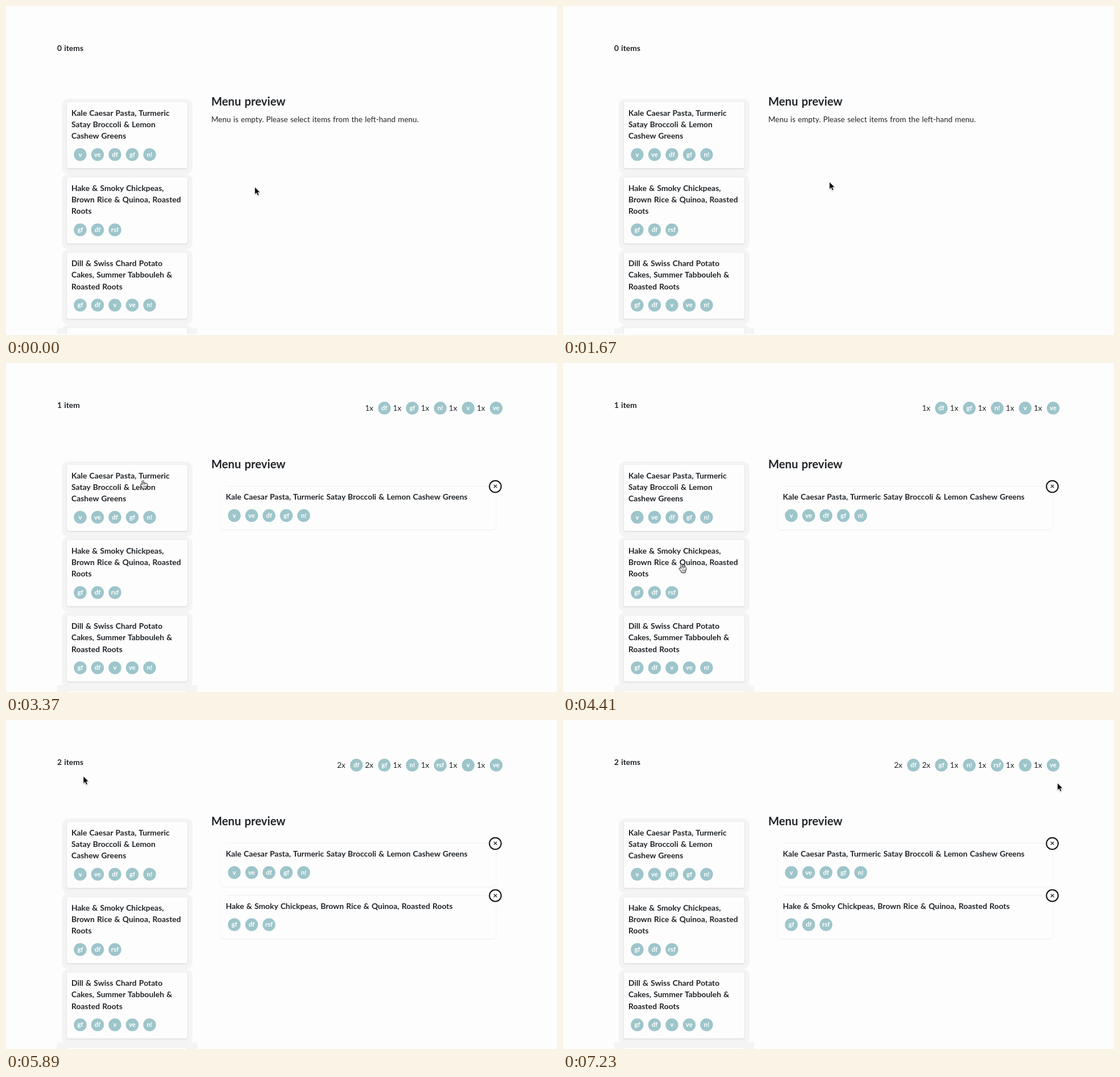
Animation of 969 by 578 pixels, one loop 8000 ms. Source, as an HTML page:

```html
<!DOCTYPE html>
<html lang="en">
<head>
<meta charset="utf-8">
<title>Menu builder</title>
<style>
  html, body { margin: 0; width: 100%; height: 100%; overflow: hidden; background: #fdfdfd; }
  svg { display: block; width: 969px; height: 578px; }
  text { font: 13.5px Lato, "Open Sans", sans-serif; word-spacing: .8px; fill: #212529; }
  .bold { font-size: 13.9px; font-weight: 700; }
  .title { font-size: 20.2px; font-weight: 700; word-spacing: 1.4px; }
  .chip circle { fill: #9dc5ca; }
  .chip text { font-size: 11.5px; font-weight: 700; fill: #fff; text-anchor: middle; }
  .frame { fill: #f4f4f4; }
  .card { fill: #fdfdfd; filter: drop-shadow(0 1px 1.5px rgba(0, 0, 0, .13)); }
  .wide { fill: #fdfdfd; filter: drop-shadow(0 1.5px 1px rgba(0, 0, 0, .07)); }
  .close circle { fill: #fdfdfd; stroke: #111; stroke-width: 2; }
  .close text { font-size: 14px; font-weight: 700; text-anchor: middle; }
  .bg { fill: #fdfdfd; }
  #cursor { filter: drop-shadow(0 1px 1px rgba(0, 0, 0, .25)); }
</style>
</head>
<body>
<svg viewBox="0 0 969 578">
  <text id="count" class="bold" x="90" y="79"></text>
  <g id="summary"></g>
  <g id="list"></g>
  <text id="title" class="title" x="361" y="175">Menu preview</text>
  <text id="empty" x="361" y="204">Menu is empty. Please select items from the left-hand menu.</text>
  <g id="preview"></g>
  <g id="cursor">
    <path id="arrow" d="M0 0V13L3 10.2L5 15L7.4 14L5.4 9.4H9.4Z" stroke="#fff" stroke-width=".8"/>
    <g id="hand" fill="#fff" stroke="#111" stroke-linejoin="round" stroke-linecap="round">
      <path d="M-1.6 7.5V1.5Q-.3 -1 1 1.5V5Q2.5 4 3.3 5.3Q7.4 4 7.4 7.5V10L6 13.2V15H-.8V13.5L-4.6 8.6Q-4.8 6.4 -2.8 7.1Z"/>
      <path stroke-width=".7" d="M1 5v3m2.3-2.5v2.5M1 10v2.5m2-2.5v2.5m2-2.5v2.5"/>
    </g>
  </g>
</svg>
<script>
const $ = id => document.getElementById(id);
const LOOP = 8000, STEP = 89;
const ADD_TIMES = [3370, 4610];

const dishes = [
  { lines: ['Kale Caesar Pasta, Turmeric', 'Satay Broccoli &amp; Lemon', 'Cashew Greens'], tags: ['v', 've', 'df', 'gf', 'n!'] },
  { lines: ['Hake &amp; Smoky Chickpeas,', 'Brown Rice &amp; Quinoa, Roasted', 'Roots'], tags: ['gf', 'df', 'rsf'] },
  { lines: ['Dill &amp; Swiss Chard Potato', 'Cakes, Summer Tabbouleh &amp;', 'Roasted Roots'], tags: ['gf', 'df', 'v', 've', 'n!'] }
];

const at = (x, y, content) => `<g transform="translate(${x} ${y})">${content}</g>`;
const rect = (cls, x, y, w, h, r = 0) =>
  `<rect class="${cls}" x="${x}" y="${y}" width="${w}" height="${h}" rx="${r}"/>`;
const label = (x, y, s, cls = '') => `<text class="${cls}" x="${x}" y="${y}">${s}</text>`;
const chip = (x, y, s) =>
  at(x, y, `<g class="chip"><circle r="11.2"/>${label(0, 3.8, s)}</g>`);
const chips = (x, y, tags) => tags.map((s, i) => chip(x + i * 30.5, y, s)).join('');
const emptyCard = rect('frame', 0, 0, 230, 132.25, 12) + rect('card', 9, 6, 212, 116, 4);

function listCard(dish, i) {
  const lines = dish.lines.map((s, k) => label(17, 29.5 + k * 20.3, s, 'bold')).join('');
  return at(98, 163 + i * 132.25, emptyCard + lines + chips(32.5, 98, dish.tags));
}

function previewCard(dish, i) {
  return at(377.5, 217 + i * 91.5, rect('wide', 0, 0, 484, 75.5, 6) +
    '<path d="M10 -.3H473" stroke="#f0f0f0"/>' +
    label(9, 23, dish.lines.join(' '), 'bold') + chips(24, 51, dish.tags) +
    at(483, 0, `<g class="close"><circle r="10.3"/>${label(0, 4.4, '×')}</g>`));
}

function summary(chosen) {
  const tags = chosen.flatMap(d => d.tags);
  const names = [...new Set(tags)].sort();
  return names.map((name, i) => {
    const x = 862 - 49.15 * (names.length - 1 - i);
    return label(x - 34, 83.5, tags.filter(s => s === name).length + 'x') + chip(x, 79.3, name);
  }).join('');
}

function showItems(n) {
  const chosen = dishes.slice(0, n), shift = n ? 10 : 0;
  $('count').textContent = n + (n === 1 ? ' item' : ' items');
  $('summary').innerHTML = summary(chosen);
  $('preview').innerHTML = chosen.map(previewCard).join('');
  $('title').setAttribute('y', 175 + shift);
  $('empty').style.display = n ? 'none' : '';
  const cards = dishes.map(listCard).join('') + at(98, 163 + 3 * 132.25, emptyCard);
  $('list').innerHTML = rect('frame', 90, 566, 246, 12) + at(0, shift, cards) +
    (n ? '' : rect('bg', 80, 576, 270, 2));
}

// Each leg starts at a time, takes a number of steps to a point, and may bow sideways.
const legs = [];
let last = { x: 437.5, y: 318 };
function leg(start, steps, x, y, bend = 0) {
  const from = last;
  last = { x, y };
  legs.push({ start, steps, from, to: last, bend });
}
leg(0, 1, last.x, last.y);
leg(690, 3, 317, 190);
leg(1230, 2, 246, 205);
leg(1400, 4, 468.5, 309);
leg(1755, 4, 424, 163, .7);
leg(2470, 5, 241, 206);
leg(3910, 6, 209, 353);
leg(4970, 5, 149.5, 67);
leg(5445, 4, 116, 126, 2.4);
leg(5800, 3, 146, 85);
leg(6250, 4, 651, 73, -.07);
leg(6600, 8, 869.5, 110.5);

function pointer(t) {
  const { start, steps, from, to, bend } = legs.findLast(l => t >= l.start);
  const u = Math.min(1, (Math.floor((t - start) / STEP) + 1) / steps);
  const dx = to.x - from.x, dy = to.y - from.y, bow = 2 * bend * u * (1 - u);
  return [from.x + dx * u - dy * bow, from.y + dy * u + dx * bow];
}

let shown = -1;
function draw() {
  const t = performance.now() % LOOP;
  const n = ADD_TIMES.filter(time => t >= time).length;
  if (n !== shown) showItems(shown = n);
  const [x, y] = pointer(t);
  const overCard = x > 107 && x < 319 && y > 169 + (n ? 10 : 0);
  $('cursor').setAttribute('transform', `translate(${x} ${y})`);
  $('arrow').style.display = overCard ? 'none' : '';
  $('hand').style.display = overCard ? '' : 'none';
  requestAnimationFrame(draw);
}
draw();
</script>
</body>
</html>
```
